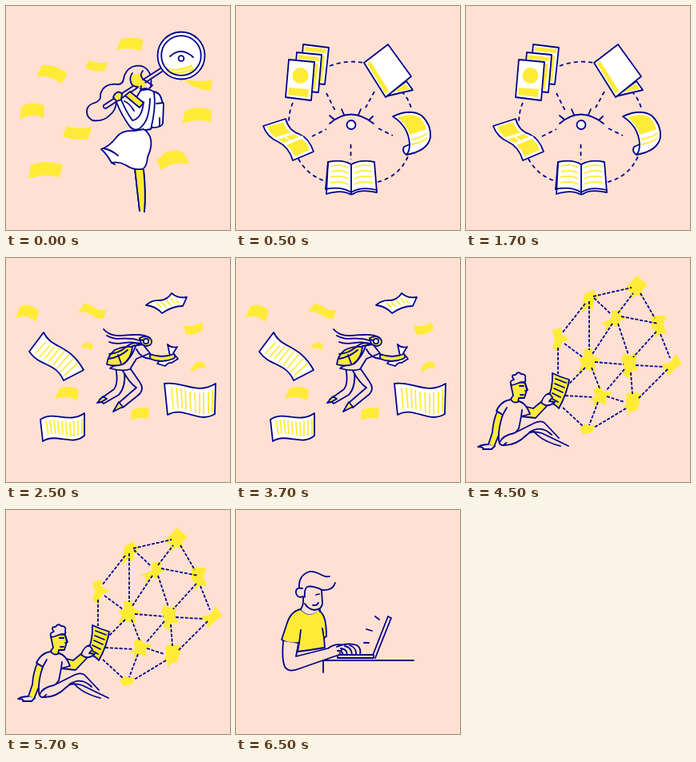
An HTML page for the animation above (8 s loop, 280 by 280 pixels).

```html
<!DOCTYPE html>
<html lang="en">
<head>
<meta charset="utf-8">
<title>Reading and research</title>
<style>
html, body { margin: 0; width: 100%; height: 100%; overflow: hidden; background: #ffe0d3; }
svg { display: block; width: 100%; height: 100%; overflow: hidden; }
path, circle { fill: none; stroke: #00008b; stroke-width: 1.8; stroke-linejoin: round; stroke-linecap: round; }
.y { fill: #ffeb37; stroke: none; }
.yo { fill: #ffeb37; }
.w { fill: #fff; }
.b { fill: #ffe0d3; }
.r { stroke: #ffeb37; stroke-linecap: butt; }
.d { stroke-dasharray: 5 4.2; stroke-linecap: butt; }
.n { stroke-dasharray: 4 1.9; stroke-linecap: butt; }
#strip { animation: cut 8s step-end infinite; }
@keyframes cut {
  0% { transform: translateX(0); }
  6.25% { transform: translateX(-300px); }
  31.25% { transform: translateX(-600px); }
  56.25% { transform: translateX(-900px); }
  81.25%, 100% { transform: translateX(-1200px); }
}
</style>
</head>
<body>
<svg viewBox="0 0 280 280">
<g id="strip">

<!-- Searching -->
<g>
  <path class="y" d="M45 74Q61 72 77 85L69 97Q56 86 38 88ZM104 68Q115 73 128 70L123 81Q112 83 99 77ZM143 42Q156 37 172 42L168 56Q154 51 139 55ZM19 126Q33 117 48 125L47 140Q31 132 17 143ZM76 150Q91 155 107 151L103 166Q88 169 71 163ZM31 199Q50 191 71 199L67 214Q48 209 28 216ZM224 131Q240 124 257 130L256 145Q238 140 220 147ZM197 184Q214 177 222 184L230 198Q210 193 194 205L188 192Q194 190 197 184ZM222 92Q240 95 258 93L256 106Q234 104 222 92Z"/>
  <circle class="w" cx="219" cy="62" r="29.500"/>
  <path class="y" d="M202 78Q215 81 232 73L235 80Q228 87 212 87Q204 85 200 82Z"/>
  <path d="M204 81Q217 84 232 77M209 86Q221 86 229 82" style="stroke:#fff;stroke-width:1.3"/>
  <circle cx="219" cy="62" r="24.800"/>
  <path d="M205 63Q219 50 234 64"/>
  <circle cx="219" cy="65.500" r="3.400"/>
  <!-- legs -->
  <path class="yo" d="M161 203Q164 230 167 256M172 205Q175 232 173 257"/>
  <path class="y" d="M162 204H172Q176 230 173 256L167 255Z"/>
  <path d="M161 203Q164 230 167 256M172 205Q175 232 173 257"/>
  <!-- hair -->
  <path d="M181 100Q183 87 177 80Q170 72 158 76Q149 80 147 91Q146 98 140 98Q127 96 121 104Q117 110 118 115Q116 120 108 122Q101 125 101 132Q101 139 108 143Q122 145 130 136Q137 131 138 120"/>
  <!-- backpack and body -->
  <path class="w" d="M183 107Q193 107 195 119L197 122L196 147Q194 152 182 152Z"/>
  <path d="M188 122L196 121M192 140V150"/>
  <path class="w" d="M168 106Q180 102 185 108Q188 126 181 154L161 157Q169 145 158 123Z"/>
  <path class="w" d="M160 156Q145 155 138 164Q130 175 119 179Q126 185 132 196Q141 194 150 199Q158 205 170 204Q176 202 177 189Q184 174 180 163Q176 156 172 154Z"/>
  <path d="M122 178Q132 180 140 187M132 196L136 198"/>
  <!-- handle, face and arms -->
  <path class="b" d="M193 78L122 124Q121 128 125 128L195 82"/>
  <path class="y" d="M157 88Q163 82 172 86Q166 91 174 96L173 101Q165 104 158 100Z"/>
  <path d="M158 84Q154 89 156 95Q157 101 165 101M171 81Q165 88 175 94L183 99L178 104M169 100L168 104L176 103"/>
  <path class="w" d="M144 117Q150 132 158 143Q170 141 172 120M138 120Q144 136 155 151Q163 159 171 149Q179 141 180 116"/>
  <path class="yo" d="M136 110Q141 105 145 110L144 117L138 119L134 114Z"/>
  <path class="yo" d="M149 112L155 107L172 121L167 127L162 123Z"/>
  <path d="M148 119Q154 121 160 131"/>
</g>

<!-- Sources -->
<g transform="translate(300)">
  <path class="d" d="M117 75Q137 67 160 71M71 121Q66 132 66 148M78 191Q90 213 115 220M177 220Q204 213 215 188M207 107Q216 115 220 131M113 109L124 131M173 107L162 127M95 163L113 154M178 153L196 162M143.500 173V192"/>
  <path d="M117 147Q143 124 172 147M123 142L117 137M135 136L132 129M153 136L156 129M166 143L171 138"/>
  <circle class="w" cx="144" cy="148.500" r="5.500"/>
  <!-- posters -->
  <path class="w" d="M84 48L116 52L111 98L80 95Z"/>
  <path class="y" d="M86 51L113 54L112.500 59L86 56ZM107 62L111 62L108 94L104 94Z"/>
  <path class="w" d="M76 58L107 61L103 108L72 105Z"/>
  <path class="y" d="M78 61L104 64L103.500 69L78 66ZM98 72L103 72L99 104L95 104Z"/>
  <path class="w" d="M66 67L98 70L94 118L62 114Z"/>
  <circle class="y" cx="80.500" cy="87" r="10"/>
  <path class="y" d="M66 102L91 104L90 114L65 111Z"/>
  <!-- folder -->
  <path class="w" d="M187 113L213 94L221 105Z"/>
  <path class="y" d="M195 108L212 97L217 104Z"/>
  <path class="w" d="M160 71L190 48L219 88L187 114Z"/>
  <path class="y" d="M164 72L168 69L191 106L187 110Z"/>
  <!-- curled page -->
  <path class="w" d="M196 138Q218 128 232 137Q244 148 243 164Q240 181 213 186Q207 182 210 176L217 173Q216 151 196 138Z"/>
  <path class="y" d="M202 139Q220 133 229 139Q236 145 238 154L217 161Q213 148 202 139Z"/>
  <path class="r" d="M219 167Q231 165 239 159M219 173Q232 171 239 165"/>
  <path d="M217 173Q217 182 213 186"/>
  <!-- leaflet -->
  <path class="w" d="M34 150L62 141Q66 156 79 160Q91 165 97 182L71 193Q66 176 53 170Q39 164 34 150Z"/>
  <path class="y" d="M39 151L59 145Q62 154 69 158L49 164Q42 159 39 151ZM52 167L72 160L79 164L60 171ZM63 174L82 166Q89 170 92 180L73 188Q70 180 63 174Z"/>
  <path d="M61 163L68 169L83 163" style="stroke:#fff"/>
  <!-- book -->
  <path class="w" d="M115 195Q133 191 144 198Q156 191 173 195L176 233Q156 229 148 234Q144 237 140 234Q130 230 113 235Z"/>
  <path d="M144 198V234M115 195L112 229Q131 225 144 233Q156 225 176 230"/>
  <path class="r" d="M119 200Q132 197 140 202M119 207Q132 204 140 209M118 214Q132 211 140 216M118 221Q132 218 140 223M148 202Q157 197 169 200M148 209Q157 204 170 207M148 216Q157 211 170 214M148 223Q157 218 171 221"/>
</g>

<!-- Flying -->
<g transform="translate(600)">
  <path class="y" d="M18 60Q29 55 41 66L37 80Q27 69 12 75ZM98 57Q106 58 111 62Q116 66 125 65L122 76Q113 76 105 70Q99 66 90 68ZM96 108Q103 103 109 109L107 115Q101 111 93 113ZM67 163Q79 158 91 165L89 178Q76 171 61 176ZM157 190Q168 185 179 188L178 201Q167 198 156 203ZM222 84Q235 87 245 80L247 89Q236 98 225 95ZM236 132Q243 126 249 133L248 138Q240 136 232 143L231 139Z"/>
  <path class="w" d="M47 93C57 114 79 107 97 140L72 153C62 130 42 136 29 117Z"/>
  <path class="r" d="M50 105L37 119M55 109L42 124M61 111L48 126M67 113L53 130M73 116L59 134M79 120L64 138M85 125L68 143M90 131L73 147"/>
  <path class="w" d="M207 44Q215 51 226 49L221 60Q208 60 195 69Q187 60 175 59Q183 52 193 53Q202 52 207 44Z"/>
  <path class="r" d="M188 56L194 62M194 55L200 61M200 53L206 59M206 50L211 57M212 52L216 57"/>
  <path class="w" d="M198 157C220 153 238 172 262 157L261 195C240 208 222 184 202 196Z"/>
  <path class="r" d="M207 162L209 189M213 162L215 188M219 163L220 188M224 165L225 189M230 167L231 191M236 168L237 194M242 169V195M247 168V196M253 167V195M258 165V193"/>
  <path class="w" d="M43 202C60 190 78 208 98 194V222C82 236 64 218 46 229Z"/>
  <path class="r" d="M50 203L53 221M55 202L57 220M60 202L62 220M65 203L66 220M70 204L71 221M75 204L76 222M80 205L81 223M85 204V223M90 203V222M95 201V220"/>
  <!-- legs -->
  <path class="b" d="M137 137Q141 156 135 164L117 177L122 182L141 171Q150 161 148 142"/>
  <path class="b" d="M146 141Q155 157 163 162L141 181L146 187L167 170Q173 163 167 155L154 136Z"/>
  <path class="yo" d="M121 173L114 181L119 180L126 176ZM141 180L134 192L140 189L146 186Z"/>
  <!-- body -->
  <path class="b" d="M158 110L171 108L180 119L163 126L155 139Q146 142 130 138Q136 133 143 133Z"/>
  <path class="yo" d="M126 133Q127 122 136 115Q146 110 158 111Q157 125 146 133Q136 136 126 133Z"/>
  <path d="M128 126Q142 124 152 115M140 121L144 132M162 110Q158 123 148 132"/>
  <path class="w" d="M202 108Q207 113 214 111L209 119L215 126L207 131Q203 130 199 135L189 132L194 126L205 122Z"/>
  <path class="yo" d="M180 120Q195 126 210 120Q213 124 209 126Q194 132 180 126Z"/>
  <path d="M163 114Q169 126 181 126"/>
  <!-- head and hair -->
  <path class="yo" d="M167 100Q177 95 182 103Q183 109 176 110Q168 110 167 100Z"/>
  <path d="M122 89C132 101 148 96 158 96Q173 95 180 100M126 97C139 105 150 97 166 103M129 105C143 111 153 101 167 108M129 120Q141 119 149 112Q158 104 168 107"/>
  <circle class="w" cx="175" cy="104" r="3.200"/>
  <path d="M167 102L172 103"/>
</g>

<!-- Network -->
<g transform="translate(900)">
  <path class="y" d="M146 56L148 45L160 39L161 45L168 46L159 55L159 64L152 62L145 69ZM204 32L214 22L227 34L220 40L221 49L212 46L205 53L206 43L198 39ZM182 66L194 64L193 72L200 75L192 79L192 86L181 84L174 92L175 84L168 82L182 76ZM232 72L250 72L247 83L251 95L242 94L236 101V91L232 86ZM108 90L119 87L119 95L130 102L120 105L116 118L108 112L111 102ZM147 114L158 113L159 122L169 127L161 132L162 143L151 139L140 142L145 132L140 126L148 123ZM197 119L206 122L214 118L212 132L215 141L208 141L204 151L196 145L198 136L194 127ZM243 134L256 130L262 120L270 132L260 140L252 148L250 140ZM159 165L167 159L172 167L184 168L175 175V184L167 180L159 186L160 178L153 179L162 173ZM200 170L208 167L219 170L217 180L214 190L206 192L202 198L203 189L196 190L200 182ZM142 212L148 208L161 209L158 218L146 220Z"/>
  <path class="n" d="M159 48L207 37M149 57L120 94M154 54V115M160 50L181 70M190 69L209 44M218 44L236 75M194 73L240 82M183 82L158 120M190 82L203 121M238 92L209 124M243 95L255 125M123 107L146 124M161 130L197 133M157 137L167 163M198 139L175 166M206 143L208 170M212 134L246 136M252 139L215 176M176 173L198 180M165 180L154 209M200 188L160 212M115 112V145M149 137L126 160M124 172L159 174M121 187L146 210"/>
  <!-- sheet -->
  <path class="yo" d="M108 144Q118 149 129 152Q126 170 116 188Q110 181 101 179Q109 163 108 144Z"/>
  <path d="M112 151L125 156M111 157L123 162M110 163L121 168M108 169L118 174M106 175L115 180"/>
  <!-- reader -->
  <path class="yo" d="M39 192Q34 203 33 218L28 233L35 236L41 221L46 196Z"/>
  <path class="b" d="M28 233Q20 233 15 236Q23 236 21 239L32 239L36 235"/>
  <path class="yo" d="M72 185L84 188L96 178L104 182L87 200L69 198Z"/>
  <path class="b" d="M94 181Q97 171 104 169L108 174L104 179L111 180Q106 185 99 184Z"/>
  <path class="b" d="M58 177Q45 177 38 191L46 196Q40 213 41 228Q42 235 47 234Q58 224 66 213L69 198L80 195Q75 181 66 179Z"/>
  <path d="M46 196L51 187M69 198L70 190"/>
  <path class="yo" d="M56 158L61 155L74 156L76 165L73 175L66 175L65 180Q58 182 56 176L59 172Z"/>
  <path class="b" d="M57 159Q53 154 60 152Q55 146 62 146Q65 141 69 145Q76 145 74 151Q76 156 69 155L61 158Z"/>
  <path d="M74 157L77 165L74 166M68 171H72M67 160L72 160"/>
  <path class="b" d="M42 231Q45 222 60 219L86 206Q95 202 100 208L116 225M79 218Q94 208 107 221M46 234Q62 235 76 221Q82 215 95 219L128 235M85 217Q95 229 118 235"/>
</g>

<!-- Typing -->
<g transform="translate(1200)">
  <path d="M109 203V188H222M174 133L179 137M163 149L170 151M160 166L166 166"/>
  <path class="b" d="M170 184L190 133L194 135L174 185"/>
  <path class="b" d="M127 181H172V185H127Z"/>
  <path class="yo" d="M81 124Q69 126 64 141L57 162Q66 168 79 166L77 177Q94 175 111 172L110 160L113 158Q113 137 108 130L103 124Q92 136 81 124Z"/>
  <path d="M79 166L81 150M110 160L108 148"/>
  <path class="b" d="M59 164Q57 187 61 196Q66 204 80 198L120 184L129 181L135 169Q124 166 115 173L75 183L78 167"/>
  <path class="b" d="M126 171Q139 165 151 169Q157 173 155 181M131 173Q139 174 139 181M136 170Q145 172 145 181M142 169Q151 172 150 181M127 176Q133 176 134 181"/>
  <path class="b" d="M84 107Q85 117 81 124Q92 137 104 124L107 120Q110 111 107 99L90 96Z" style="stroke:none"/>
  <path d="M84 109Q85 118 81 124M107 101L108 116Q108 124 98 125Q90 124 86 117M105 123V127M100 106L104 105M96 119Q101 120 103 116"/>
  <path d="M117 83C109 86 104 76 92 77C82 80 78 88 79 97M124 91Q121 101 108 100Q95 94 89 96Q85 99 86 109"/>
  <path d="M83 98Q74 96 75 104Q77 111 84 108"/>
</g>

</g>
</svg>
</body>
</html>
```
